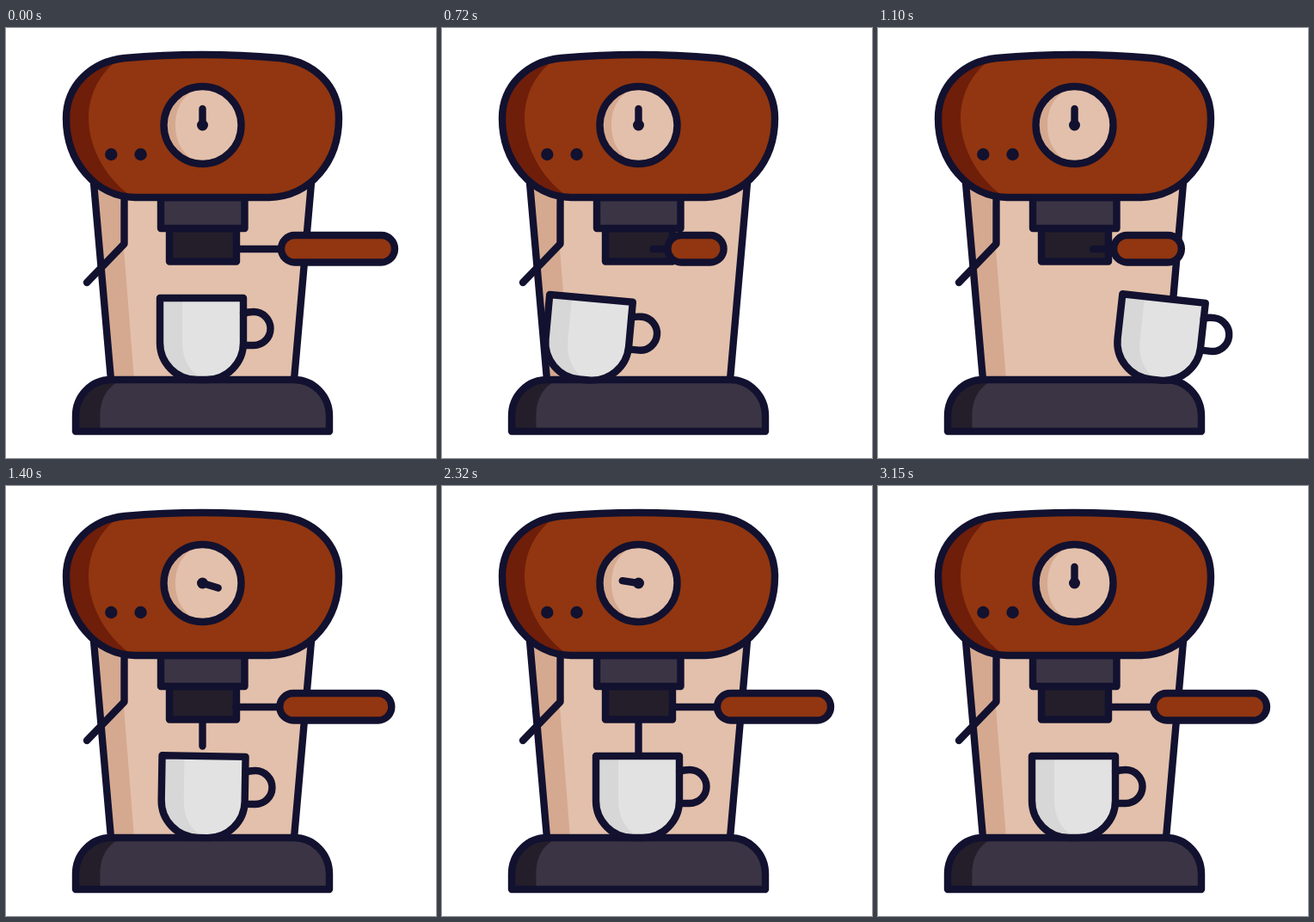
An HTML page for the animation above (3.17 s loop, 500 px wide and 500 px high).

```html
<!DOCTYPE html>
<html lang="en">
<head>
<meta charset="utf-8">
<title>Espresso machine</title>
<style>
  html, body { margin: 0; width: 100%; height: 100%; overflow: hidden; background: #fff; }
  svg { display: block; width: 100vw; height: 100vh; }
  .ink { stroke: #12112f; stroke-width: 8.4; stroke-linecap: round; stroke-linejoin: round; }
  .line { fill: none; }
  .dark { fill: #12112f; }
  .brown { fill: #913610; }
  .brown-shade { fill: #6f1e0a; }
  .tan { fill: #e3c0ab; }
  .tan-shade { fill: #d5a990; }
  .grey { fill: #3a3444; }
  .black { fill: #241e2b; }
  .china { fill: #e2e2e2; }
  .china-shade { fill: #d7d7d7; }
</style>
</head>
<body>
<svg viewBox="0 0 500 500">
  <defs>
    <path id="head" d="M138 35Q228 27 318 35C358 39 387 67 387 105C387 155 354 196 306 197H150C104 196 70 155 70 105C70 67 99 39 138 35Z"/>
    <path id="base" d="M81 469V451C81 428 99 409 122 409H335C358 409 376 428 376 451V469Z"/>
    <path id="bowl" d="M179 314H276V366a43 43 0 0 1-43 43H222a43 43 0 0 1-43-43Z"/>
    <circle id="dial" cx="228.5" cy="113" r="45"/>
    <clipPath id="inHead"><use href="#head"/></clipPath>
    <clipPath id="inBase"><use href="#base"/></clipPath>
    <clipPath id="inBowl"><use href="#bowl"/></clipPath>
    <clipPath id="inDial"><use href="#dial"/></clipPath>
  </defs>

  <!-- body -->
  <path class="tan" d="M102 180H355L335 409H122Z"/>
  <path class="tan-shade" d="M102 180H131L149 409H122Z"/>
  <path class="ink line" d="M102 180L122 409M355 180L335 409"/>
  <path class="ink line" d="M137.500 195V251L94 296"/>

  <!-- brew group -->
  <line id="stream" class="ink" x1="228.5" x2="228.5" y1="268" y2="268"/>
  <rect class="ink black" x="190" y="233" width="78" height="38.5"/>
  <rect class="ink grey" x="180" y="197" width="97.500" height="36"/>
  <line id="stem" class="ink" x1="268" x2="320" y1="257" y2="257"/>
  <rect id="grip" class="ink brown" x="320" y="241" width="132" height="31.5" rx="15.7"/>

  <!-- head -->
  <use href="#head" class="brown"/>
  <path class="brown-shade" clip-path="url(#inHead)" d="M135 33C108 52 96 78 96 105C96 140 118 178 148 197H60V30Z"/>
  <use href="#head" class="ink line"/>
  <circle class="dark" cx="122.3" cy="147" r="7.2"/>
  <circle class="dark" cx="156.6" cy="147" r="7.2"/>
  <use href="#dial" class="tan"/>
  <path class="tan-shade" clip-path="url(#inDial)" d="M228 68C207 75 197 92 197 113C197 134 207 151 228 158H180V68Z"/>
  <use href="#dial" class="ink line"/>
  <circle class="dark" cx="228.5" cy="113" r="6.5"/>
  <path id="needle" class="ink line" d="M228.5 113V94"/>

  <!-- base -->
  <use href="#base" class="grey"/>
  <path class="black" clip-path="url(#inBase)" d="M136 409C119 415 109.5 430 109.5 451V469H81V409Z"/>
  <use href="#base" class="ink line"/>

  <g id="cup">
    <use href="#bowl" class="china"/>
    <path class="china-shade" clip-path="url(#inBowl)" d="M205 314V365Q205 397 232 410H175V314Z"/>
    <use href="#bowl" class="ink line"/>
    <path class="ink line" d="M276 332Q281 330 288 330A19.5 19.5 0 0 1 288 369H277"/>
  </g>
</svg>
<script>
  const LOOP = 3170;
  const $ = id => document.getElementById(id);
  const [cup, grip, stem, stream, needle] = ["cup", "grip", "stem", "stream", "needle"].map($);

  // cubic-bezier(.5, 0, .3, 1)
  function ease(x) {
    if (x <= 0) return 0;
    if (x >= 1) return 1;
    let lo = 0, hi = 1, s = 0.5;
    for (let i = 0; i < 24; i++) {
      s = (lo + hi) / 2;
      const r = 1 - s;
      if (1.5 * r * r * s + 0.9 * r * s * s + s * s * s < x) lo = s;
      else hi = s;
    }
    return s * s * (3 - 2 * s);
  }

  const ramp = (t, from, to) => ease((t - from) / (to - from));
  const pulse = (t, a, b, c, d) => ramp(t, a, b) - ramp(t, c, d);

  function setAll(el, attrs) {
    for (const name in attrs) el.setAttribute(name, attrs[name]);
  }

  function render(t) {
    // the cup leaves on the left and comes back from the right
    const slide = ramp(t, 517, 1442);
    const shift = 660 * (slide < 0.5 ? -slide : 1 - slide);
    const tilt = 6.5 * pulse(t, 520, 865, 1018, 1631);
    setAll(cup, { transform: `translate(${shift} 0) rotate(${tilt} 228 410)` });

    const turn = 1.25 * pulse(t, 520, 855, 866, 1513);
    const left = 320 - 56 * turn;
    const right = 452 - 121 * turn;
    setAll(grip, { x: left, width: right - left });
    setAll(stem, { x1: 268 - 22 * turn, x2: left });

    const pour = pulse(t, 1080, 1935, 2220, 3075);
    setAll(stream, { y2: 268 + 92 * pour });
    setAll(needle, { transform: `rotate(${285 * pour} 228.5 113)` });
  }

  const start = performance.now();
  function tick() {
    render((performance.now() - start) % LOOP);
    requestAnimationFrame(tick);
  }
  tick();
</script>
</body>
</html>
```
